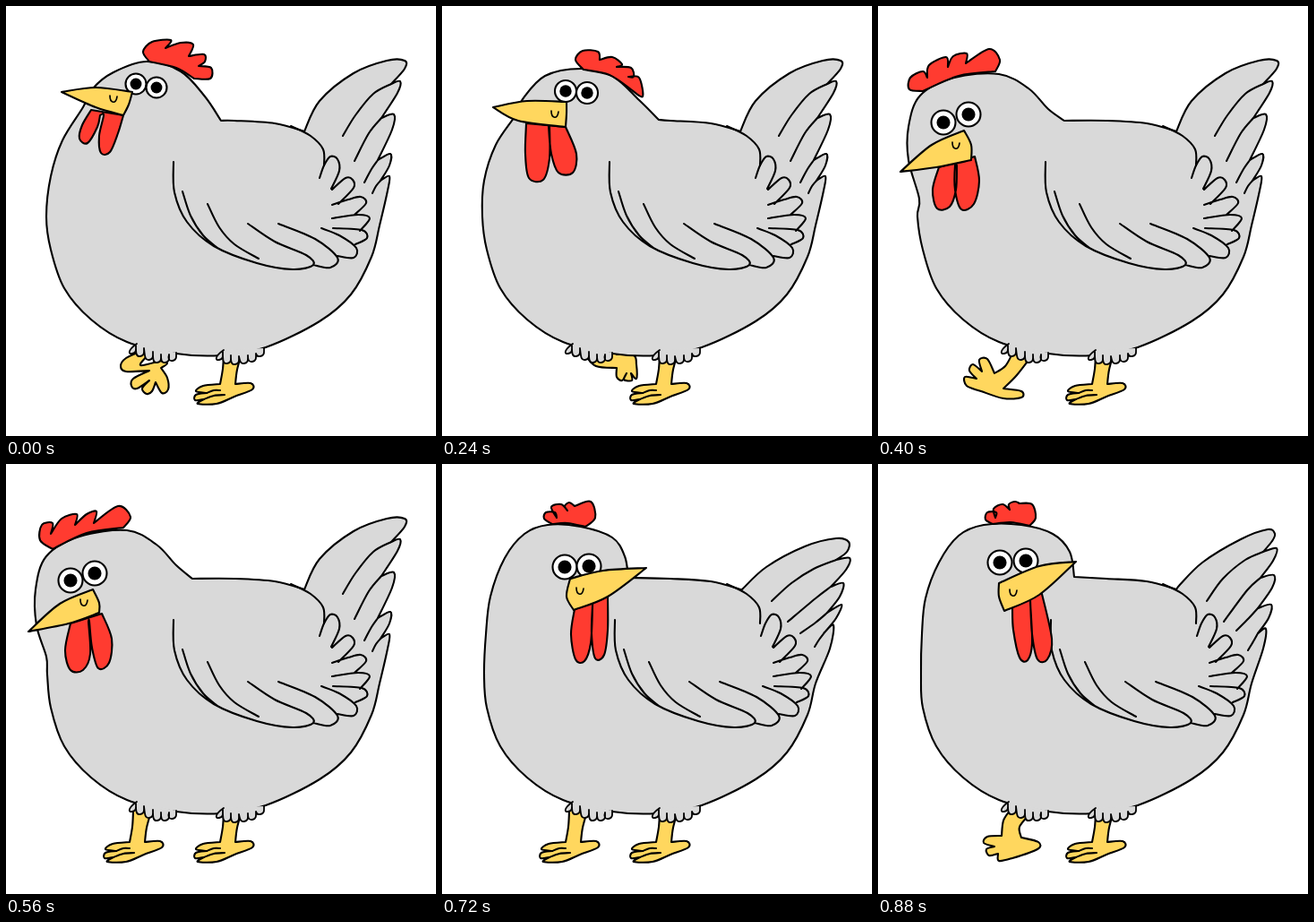
These frames come from a looping animation (480x480 px, 0.96 s). An HTML page:

```html
<!DOCTYPE html>
<html lang="en">
<head>
<meta charset="utf-8">
<title>Walking hen</title>
<style>
  html, body { margin: 0; width: 100%; height: 100%; overflow: hidden; background: #fff; }
  svg { display: block; width: 100%; height: 100%; }
</style>
</head>
<body>
<svg id="stage" viewBox="0 0 480 480" fill="none" stroke="#000" stroke-width="2.1" stroke-linecap="round" stroke-linejoin="round"></svg>
<script>
const GREY = '#d9d9d9', RED = '#ff3b30', YELLOW = '#ffd75e';
const STEP = 80, COUNT = 12;
const svg = document.getElementById('stage');

function add(tag, attrs, parent = svg) {
  const el = document.createElementNS('http://www.w3.org/2000/svg', tag);
  for (const k in attrs) el.setAttribute(k, attrs[k]);
  return parent.appendChild(el);
}

// Smooth run through points
function run(p) {
  let d = '';
  for (let i = 0; i < p.length - 1; i++) {
    const a = p[i - 1] || p[i], b = p[i], c = p[i + 1], e = p[i + 2] || c;
    const ctl = [0, 1].map(k => b[k] + (c[k] - a[k]) / 6);
    const end = [0, 1].map(k => c[k] - (e[k] - b[k]) / 6);
    d += `C${ctl} ${end} ${c}`;
  }
  return d;
}

// "|" marks a corner, ";" starts a new stroke
function path(text, close) {
  return text.split(';').map(stroke => {
    let last = null, d = '';
    for (const part of stroke.split('|')) {
      const p = part.trim().split(/\s+/).map(s => s.split(',').map(Number));
      if (last) p.unshift(last); else d = 'M' + p[0];
      d += run(p);
      last = p[p.length - 1];
    }
    return d + (close ? 'Z' : '');
  }).join('');
}

function mix(a, b, t = 0.5) {
  const out = {};
  for (const k in a) {
    const n = b[k].match(/[\d.]+/g);
    let i = 0;
    out[k] = a[k].replace(/[\d.]+/g, v => +v + (n[i++] - v) * t);
  }
  return out;
}

const BELLY = ' 417,245 408,280 385,322 350,352 290,381 240,390 190,388 135,375 95,350 65,315 50,272 ';
const BACK = ' | 255,128 300,131 333,140';

const tailUp = {
  tail: '333,140 350,106 388,75 425,61 445,61 445,70 430,87 | 440,84 437,97 419,125 | 433,121 431,138 415,172 | 429,165 428,178 418,195 | 428,190 426,206',
  veins: '430,87 410,98 390,122 376,145; 419,125 405,142 389,173; 415,172 408,182 400,197; 418,195 413,201 409,209',
  wing: '0'
};
const tailLow = {
  tail: '335,140 362,115 405,92 440,83 454,87 452,98 440,107 | 455,105 451,118 434,137 | 448,133 444,148 430,166 | 446,157 440,172 427,188 | 437,180 433,206',
  veins: '440,107 415,117 390,133 368,153; 434,137 417,150 386,176; 430,166 417,177 400,189; 427,188 421,196 416,204',
  wing: '6'
};
const tailMid = {
  tail: '335,137 362,110 405,84 435,73 443,78 440,86 430,98 | 445,94 441,108 427,127 | 442,124 440,138 424,161 | 439,157 436,172 424,189 | 433,184 430,206',
  veins: '430,98 410,107 385,128 367,153; 427,127 412,141 386,176; 424,161 414,172 400,186; 424,189 419,198 413,208',
  wing: '6'
};

const proud = {
  ...tailUp,
  head: '45,235 50,190 63,150 86,113 97,92 120,74 157,62 195,73 222,101 240,128',
  comb: '160,62 153,51 163,40 184,38 178,47 | 195,41 209,43 204,56 | 221,54 222,62 215,67 | 229,69 228,81 210,81 | 190,69 160,62',
  eyes: '145,87 168,91 11.5',
  beak: '62,96 100,91 141,96 | 137,110 131,122 | 100,113 62,96',
  nose: '120,103',
  wattle: '95,116 85,133 82,148 91,153 102,135 105,122 | 109,122 104,145 106,164 116,163 125,142 131,122'
};
const alert = {
  ...proud,
  eyes: '147,87 167,92 11.5',
  beak: '57,94 100,90 143,95 | 138,110 133,122 | 95,112 57,94',
  nose: '121,103'
};
const dip = {
  ...tailUp,
  head: '45,235 47,195 60,155 82,122 90,104 115,78 155,70 190,78 220,105 242,127',
  comb: '158,71 149,60 157,50 174,51 176,60 | 190,57 201,65 195,68 | 211,69 214,79 208,79 | 220,80 224,101 212,94 | 187,77 158,71',
  eyes: '138,95 162,97 12',
  beak: '57,113 95,106 139,107 | 139,120 138,135 | 85,128 57,113',
  nose: '126,120',
  wattle: '94,131 93,165 97,192 113,194 120,170 120,134 | 119,134 122,165 130,186 146,186 150,165 138,135'
};
const reach = {
  ...tailUp,
  head: '44,235 46,215 34,172 34,135 47,100 85,80 135,76 168,92 190,115 208,128',
  comb: '50,95 35,93 36,80 50,73 55,80 | 57,66 76,57 78,68 | 84,56 99,53 98,64 | 124,48 136,60 131,73 | 90,78 50,95',
  eyes: '73,130 101,121 13.5',
  beak: '25,185 60,155 96,139 | 104,155 104,172 | 65,180 25,185',
  nose: '87,155',
  wattle: '68,180 61,205 66,226 80,224 87,205 88,178 | 86,178 86,205 93,227 107,221 113,195 108,168'
};
const rest = {
  ...tailUp,
  head: '46,235 45,215 34,180 33,140 45,103 82,81 135,74 168,90 190,113 208,128',
  comb: '52,95 38,85 40,68 52,66 50,78 | 62,61 79,56 77,68 | 90,56 101,53 98,66 | 125,47 139,59 131,71 | 90,77 52,95',
  eyes: '72,130 99,122 13.5',
  beak: '25,187 60,156 97,140 | 104,155 104,166 | 70,178 25,187',
  nose: '87,154',
  wattle: '72,178 66,208 72,230 86,230 94,212 92,176 | 93,176 96,205 103,228 115,222 118,195 107,167'
};
const lookBack = {
  ...tailLow,
  head: '47,235 49,190 54,148 70,105 92,78 118,68 155,70 190,82 204,103 208,127',
  comb: '123,67 114,61 116,54 126,54 128,60 | 122,48 133,45 140,52 | 137,47 142,43 148,47 | 166,42 171,60 160,70 | 140,66 123,67',
  eyes: '137,115 164,114 13.5',
  beak: '228,116 180,119 143,128 | 139,148 147,163 | 185,148 228,116',
  nose: '154,141',
  wattle: '148,162 144,190 149,218 159,220 166,200 168,160 | 168,158 167,190 171,217 181,213 185,185 185,148'
};
const glance = {
  ...tailMid,
  head: '48,235 49,190 53,150 68,110 90,80 118,68 160,68 195,78 214,98 219,126',
  comb: '128,67 120,62 122,54 132,54 131,60 | 129,50 139,45 147,51 | 146,45 153,42 158,44 | 172,45 176,60 169,69 | 148,65 128,67',
  eyes: '136,110 165,108 13.5',
  beak: '221,109 180,114 135,133 | 135,148 141,164 | 180,146 221,109',
  nose: '151,143',
  wattle: '150,160 151,185 158,216 167,219 172,200 170,155 | 170,152 172,190 178,218 189,218 194,195 182,141'
};
const turn = {
  ...mix(rest, lookBack),
  beak: '118,164 108,148 112,133 | 126,130 136,139 | 130,154 118,164',
  nose: '122,142'
};

const poses = [proud, mix(proud, alert), alert, dip, mix(dip, reach), reach,
  mix(reach, rest), rest, turn, lookBack, mix(lookBack, glance), glance];

const STAND = '243,388 242,405 239,422 | 220,424 212,430 224,432 | 212,434 211,440 221,439 | 214,444 235,444 255,436 275,428 273,421 256,422 | 258,406 263,388';
const TOES = '224,432 232,429 239,429; 221,439 232,435 244,434';
const LIFT = '152,385 134,393 128,402 134,408 160,407 | 142,416 140,424 146,427 160,418 | 152,427 157,433 163,430 167,420 | 174,432 181,428 180,415 173,404 | 180,399 172,396 | 150,401 160,388';
const CURL = '148,388 158,402 180,406 193,404 | 178,411 179,421 187,422 196,413 | 190,420 198,424 204,418 | 213,418 214,403 215,390 190,389 183,395 | 165,388';
const TUCK = '160,390 172,402 195,404 | 195,414 201,418 206,410 | 203,417 212,418 211,410 | 217,416 217,400 214,390 195,389';
const STRIDE = '150,388 142,402 130,410 | 122,394 113,395 116,408 | 106,400 102,407 110,416 | 97,414 99,424 115,430 140,438 160,437 160,430 140,427 | 155,412 172,390';
const PEEL = '148,386 140,398 138,415 | 122,416 118,423 130,427 | 121,430 124,437 134,435 | 135,443 150,440 178,430 179,422 160,417 | 158,405 170,390';

// Foot shape with its offset
const stand = [STAND, -101, 0];
const feet = [[LIFT, 0, 0], [CURL, -8, 4], [CURL, 0, 0], [TUCK, 0, 0], [LIFT, -4, 0], [STRIDE, 0, 0],
  stand, stand, stand, stand, stand, [PEEL, 0, 0]];

const WING = [
  '187,174 188,208 202,241 232,268 280,287 320,294 343,289 335,278 300,263 270,243',
  '343,289 362,292 370,281 345,260 304,243',
  '370,279 388,281 391,270 372,256 352,248',
  '390,266 403,259 397,250 365,248',
  '395,251 406,237 393,233 364,237',
  '389,233 402,220 396,213 382,216 364,222',
  '371,221 388,203 387,194 379,192 364,205',
  '363,204 372,184 370,171 362,168 355,178 350,192',
  '197,207 206,234 220,256 236,270',
  '225,221 238,247 255,266 282,282'
].join(';');

function tuft(tips, rise) {
  let d = `M${tips[0][0] + 5},${tips[0][1] - 11}`;
  for (const [x, y] of tips) d += `C${x - 5},${y - 4} ${x - 5},${y + 1} ${x},${y}S${x + 4},${y - 5} ${x + 4},${y - rise}`;
  return add('path', { d, fill: GREY, 'stroke-width': 1.8 });
}

const foot = add('path', { fill: YELLOW });
const toes = add('path', { d: path(TOES) });
add('path', { d: path(STAND), fill: YELLOW });
add('path', { d: path(TOES) });
const body = add('path', { fill: GREY });
tuft([[141, 388], [150, 391], [160, 395], [169, 398], [178, 398], [186, 396]], 9);
tuft([[238, 395], [247, 399], [256, 400], [266, 399], [275, 397], [284, 391]], 9);
const veins = add('path', {});
add('path', { d: path('318,134 340,145 354,160 355,178') });
const wing = add('path', { d: path(WING) });
const comb = add('path', { fill: RED });
const eyes = [0, 1].map(() => ({
  white: add('circle', { fill: '#fff' }),
  pupil: add('circle', { fill: '#000', stroke: 'none' })
}));
const wattle = add('path', { fill: RED });
const beak = add('path', { fill: YELLOW });
const nose = add('path', { d: 'M-4,-3C-4,6 3,7 4,-2', 'stroke-width': 1.7 });

const shapes = poses.map(p => ({
  body: path(p.tail + BELLY + p.head + BACK, true),
  veins: path(p.veins),
  comb: path(p.comb, true),
  wattle: path(p.wattle, true),
  beak: path(p.beak, true)
}));
const parts = { body, veins, comb, wattle, beak };

function show(i) {
  const p = poses[i], [shape, dx, dy] = feet[i];
  for (const k in parts) parts[k].setAttribute('d', shapes[i][k]);
  wing.setAttribute('transform', `translate(${p.wing})`);
  nose.setAttribute('transform', `translate(${p.nose})`);
  foot.setAttribute('d', path(shape));
  foot.setAttribute('transform', `translate(${dx},${dy})`);
  toes.setAttribute('transform', `translate(${dx},${dy})`);
  toes.style.display = shape === STAND ? '' : 'none';
  const e = p.eyes.split(/[ ,]/).map(Number);
  eyes.forEach((eye, k) => {
    for (const [el, r] of [[eye.white, e[4]], [eye.pupil, e[4] * 0.56]]) {
      el.setAttribute('cx', e[k * 2]);
      el.setAttribute('cy', e[k * 2 + 1]);
      el.setAttribute('r', r);
    }
  });
}

let start = null, shown = 0;
function tick(now) {
  if (start === null) start = now;
  const i = Math.floor(Math.max(0, now - start) / STEP) % COUNT;
  if (i !== shown) show(shown = i);
  requestAnimationFrame(tick);
}
show(0);
requestAnimationFrame(tick);
</script>
</body>
</html>
```
